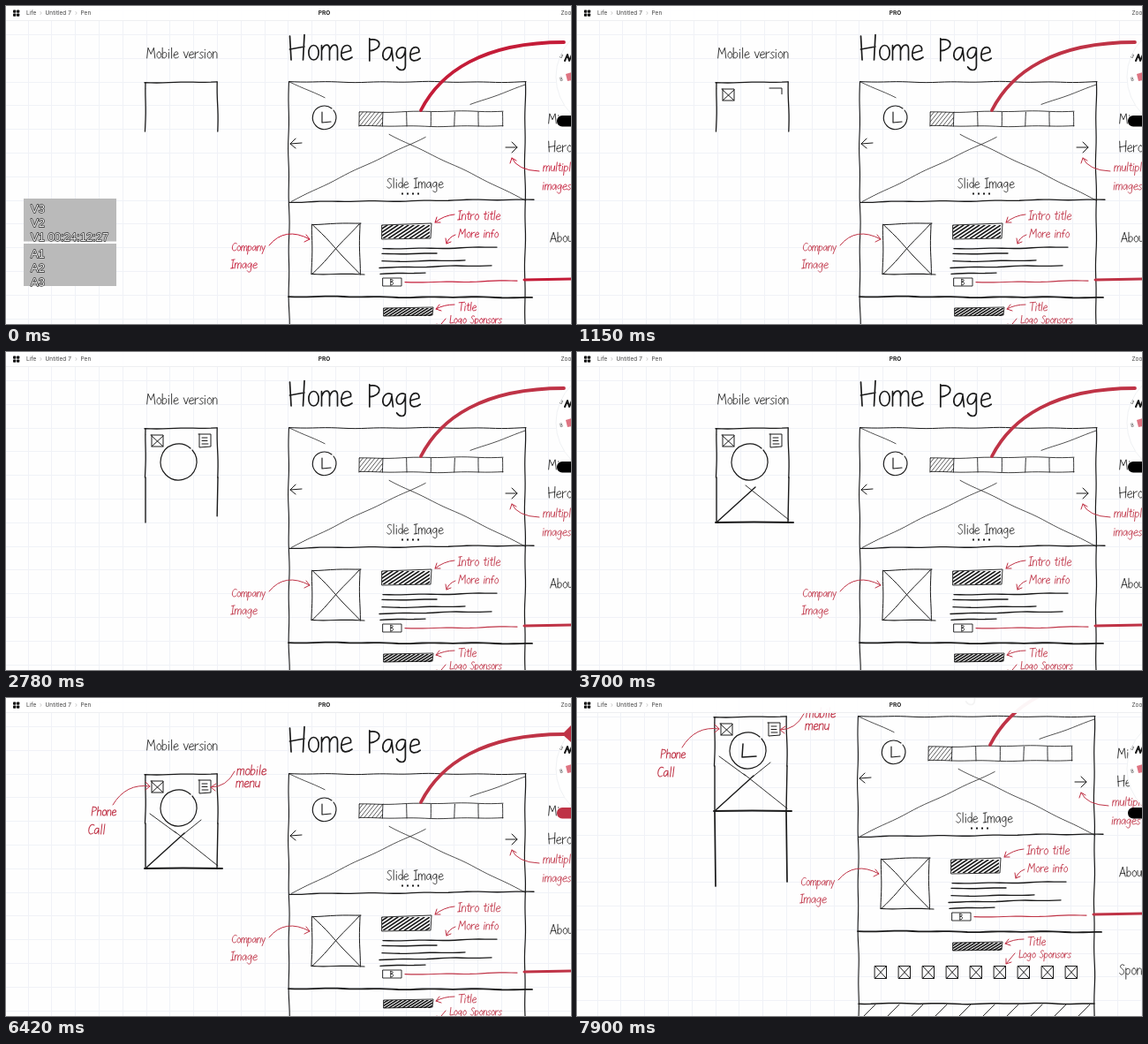
These frames come from a looping animation (640 px wide and 360 px high, 8 s). An HTML page with a canvas:

```html
<!DOCTYPE html>
<html lang="en">
<head>
<meta charset="utf-8">
<title>Wireframe sketch</title>
<style>
html, body { margin: 0; width: 100%; height: 100%; overflow: hidden; background: #fff; }
canvas { display: block; width: 640px; height: 360px; }
</style>
</head>
<body>
<canvas id="stage" width="640" height="360"></canvas>
<script>
const ctx = document.getElementById('stage').getContext('2d');
const LOOP = 8000, CELL = 26.8, INK = '#1a1a1a';
let now = 0, red = '#bf3346';

// Handwriting: advance and pen path per letter, baseline at y = 20.
const GLYPHS = {
  A: [14, 'M1 20L7 2 12 20M3 14H11'],
  B: [10, 'M2 2V20M2 3C12 2 10 10 2 10C13 10 11 20 2 20'],
  C: [12, 'M11 4C5-1 1 8 2 14S7 22 11 18'],
  H: [14, 'M1 2L2 20M12 1L11 20M1 12L12 10'],
  I: [8, 'M1 3L7 2M4 3V20M1 20L7 19'],
  L: [10, 'M2 2V20L10 19'],
  M: [17, 'M1 20L3 2 8 13 13 2 15 20'],
  P: [12, 'M2 2V20M2 3C12 1 13 11 2 12'],
  S: [11, 'M9 4C4 0 0 6 4 9S10 15 8 18 3 21 1 18'],
  T: [12, 'M0 3L12 2M6 3V20'],
  a: [11, 'M8 10C3 7 0 13 1 17S7 20 8 11L9 20'],
  b: [10, 'M1 2V20M1 13C3 8 9 9 8 15S3 21 1 18'],
  d: [10, 'M8 2V20M8 12C5 8 0 11 1 16S7 20 8 15'],
  e: [10, 'M1 15L8 13C9 8 2 7 1 14S5 21 9 18'],
  f: [8, 'M7 4Q3 1 3 8V20M0 11H6'],
  g: [11, 'M8 10C3 7 0 13 1 16S7 19 8 11V24C8 29 3 28 1 25'],
  h: [10, 'M1 2V20M1 13C3 8 8 8 8 13V20'],
  i: [5, 'M2 10V20M2 5V6'],
  l: [5, 'M2 2V20'],
  m: [15, 'M1 9V20M1 13C3 7 7 8 7 12V20M7 13C9 7 13 8 13 12V20'],
  n: [10, 'M1 9V20M1 13C3 7 8 8 8 13V20'],
  o: [10, 'M5 9C0 9 0 20 5 20S10 9 5 9'],
  p: [10, 'M1 9V28M1 12C3 8 9 9 8 15S3 21 1 18'],
  r: [8, 'M1 9V20M1 13Q3 9 7 9'],
  s: [8, 'M7 10C3 8 0 11 3 14S8 17 6 19 2 20 0 19'],
  t: [7, 'M3 4V17Q3 21 6 19M0 9L6 8'],
  u: [10, 'M1 9V16C1 21 7 20 8 15V9V20'],
  v: [9, 'M0 9L4 20 8 9'],
  y: [9, 'M0 9L4 18M8 9L3 27'],
  ' ': [8, '']
};
for (const k in GLYPHS) GLYPHS[k][1] = new Path2D(GLYPHS[k][1]);

function write(text, x, y, scale, color = INK, width = 0.85, count = text.length) {
  const slant = color === INK ? 0 : -0.12;
  ctx.save();
  ctx.translate(x, y);
  ctx.transform(scale, 0, slant * scale, scale, 0, 0);
  ctx.translate(0, -20);
  ctx.strokeStyle = color;
  ctx.lineWidth = width / scale;
  for (const ch of text.slice(0, count)) {
    ctx.stroke(GLYPHS[ch][1]);
    ctx.translate(GLYPHS[ch][0], 0);
  }
  ctx.restore();
}

function pen(path, width = 1, color = INK) {
  ctx.strokeStyle = color;
  ctx.lineWidth = width;
  ctx.stroke(new Path2D(path));
}

// Straight pen line with a slightly unsteady hand.
function wire(x1, y1, x2, y2, width = 1, color = INK) {
  const length = Math.hypot(x2 - x1, y2 - y1), steps = Math.ceil(length / 7);
  const nx = (y1 - y2) / length, ny = (x2 - x1) / length;
  ctx.beginPath();
  for (let i = 0; i <= steps; i++) {
    const p = i / steps, s = p * length;
    const off = 0.35 * Math.sin(s / 9 + x1) + 0.3 * Math.sin(s / 23 + y1);
    ctx.lineTo(x1 + (x2 - x1) * p + nx * off, y1 + (y2 - y1) * p + ny * off);
  }
  ctx.strokeStyle = color;
  ctx.lineWidth = width;
  ctx.stroke();
}

// Pen stroke growing between two times, appearing with a given share drawn.
function grow(path, length, from, to, width = 1.2, color = INK, share = 0.1) {
  if (now < from) return;
  const p = to > from ? Math.min(1, share + (1 - share) * (now - from) / (to - from)) : 1;
  if (p < 1) ctx.setLineDash([length * p, 999]);
  pen(path, width, color);
  ctx.setLineDash([]);
}

function hatch(x, y, w, h, gap, width, lean) {
  ctx.save();
  ctx.beginPath();
  ctx.rect(x, y, w, h);
  ctx.clip();
  for (let i = x - h * lean; i < x + w; i += gap) pen(`M${i} ${y + h}L${i + h * lean} ${y}`, width);
  ctx.restore();
}

const crossBox = (x, y, w, h, width) =>
  pen(`M${x} ${y}h${w}v${h}h${-w}zl${w} ${h}m0 ${-h}l${-w} ${h}`, width);

function grid(dx, dy) {
  ctx.fillStyle = '#f0f2f7';
  for (let x = (24.6 + dx) % CELL; x < 640; x += CELL) ctx.fillRect(Math.round(x), 0, 1, 360);
  for (let y = (5.1 + 3 * CELL + dy) % CELL; y < 360; y += CELL) ctx.fillRect(0, Math.round(y), 640, 1);
}

function homePage() {
  write('Home', 320, 61, 1.5, INK, 1.7);
  write('Page', 409, 62, 1.4, INK, 1.7);
  wire(320, 86, 589, 86, 1);
  wire(588, 86, 588, 430, 1.2);
  wire(320, 86, 321, 430, 1.1);
  wire(321, 222, 598, 219, 1.3);
  wire(320, 329, 596, 330, 1.8);
  wire(321, 411, 588, 411, 1.5);
  wire(321, 86, 361, 104, 0.75);
  wire(526, 112, 588, 89, 0.75);
  wire(323, 221, 475, 148, 0.75);
  wire(434, 145, 589, 220, 0.75);
  pen('M369 116A13.3 13.3 0 1 0 371 118M358 120V132L368 131', 1.15);
  wire(400, 120, 563, 119, 0.85);
  wire(400, 136, 563, 136, 0.85);
  for (let x = 400; x < 570; x += 27.1) wire(x, 120, x, 136, 0.85);
  hatch(400, 120, 27, 16, 4.5, 0.7, 0.8);
  pen('M335 155L322 156M328 150L322 156 328 161M566 160H579M573 154L579 160 573 166', 1);
  write('Slide Image', 431, 206, 0.625);
  ctx.fillStyle = INK;
  for (let x = 449; x < 470; x += 6) ctx.fillRect(x - 1, 211.5, 2, 2);

  wire(347, 247, 402, 246);
  wire(401, 246, 401, 304);
  wire(347, 247, 346, 303);
  wire(346, 303, 406, 304, 1.2);
  wire(348, 248, 400, 303);
  wire(400, 247, 347, 303);
  pen('M426 248L482 246 481 263 426 264Z', 0.9);
  hatch(426, 248, 54, 15, 6, 1.6, 1.5);
  wire(427, 275, 556, 273, 1.4);
  wire(426, 281, 488, 280, 1.4);
  wire(426, 289, 520, 288, 1.4);
  wire(423, 296, 550, 294, 1.4);
  wire(424, 303, 475, 302, 1.4);
  pen('M427 308H448V317H427Z', 0.9);
  write('B', 435, 316, 0.38);
  pen('M428 342L484 341 483 350 428 351Z', 0.9);
  hatch(428, 342, 55, 9, 5, 1.6, 1.6);
  for (let i = 0; i < 9; i++) crossBox(339.5 + i * 27, 368.5, 13, 14, 1);
  for (let x = 327; x < 585; x += 27) pen(`M${x} 425L${x + 13} 412`, 0.9);

  write('Mi', 614, 133, 0.62);
  write('Hero', 614, 165, 0.66);
  write('About', 616, 267, 0.6);
  write('Sponsors', 616, 378, 0.65);
}

function notes() {
  write('Intro title', 511, 242, 0.58, red);
  write('More info', 512, 262, 0.535, red);
  write('Company', 255, 277, 0.5, red);
  write('Image', 254, 297, 0.56, red);
  write('Title', 512, 345, 0.54, red);
  write('Logo Sponsors', 502, 359, 0.48, red);
  write('multiple', 608, 187, 0.56, red);
  write('images', 607, 208, 0.55, red);
  pen('M508 236Q496 237 486 245M488 239L486 245 492 245', 1, red);
  pen('M509 259Q501 262 499 269M498 263L499 269 504 267', 1, red);
  pen('M298 271Q316 249 344 264M340 259L344 264 338 267', 1, red);
  pen('M604 187Q579 186 573 172M571 178L573 172 578 175', 1, red);
  pen('M508 338Q496 338 487 343M491 338L487 343 493 345', 1, red);
  pen('M498 354L488 366M488 360L488 366 494 364', 1, red);
  wire(452, 313, 579, 311, 1.2, red);
  pen('M587 310L642 309', 3, red);
  pen('M470 118C492 75 540 41 632 41', 3.8, red);
}

function mobilePage() {
  write('Mobile version', 159, 59, 0.65);
  wire(157, 87, 239, 85.5, 1.3);
  wire(158, 87, 158, 142, 1.3);
  wire(239, 86, 240, 142, 1.3);
  grow('M164 94H178V107H165V94', 54, 310, 560, 1);
  grow('M165 95L178 107', 18, 600, 720, 1);
  grow('M178 95L165 107', 18, 740, 860, 1);
  grow('M218 93L232 93V107L219 108V93', 57, 1040, 1420, 1);
  grow('M222 97H228M222 100.5H228M222 104H229', 7, 1630, 1870, 1);
  grow('M209 109A20.5 20.5 0 1 0 211 111', 127, 2130, 2300, 1.2, INK, 0.55);
  grow('M158 142V193', 51, 2540, 2660, 1.4);
  grow('M240 142L239 193', 51, 2680, 2800, 1.4);
  grow('M157 193Q200 192 245 193', 88, 2820, 2960, 1.9);
  grow('M159 192L202 153', 59, 3180, 3300, 1.4, INK, 0.5);
  grow('M191 151L240 190', 0, 3700, 3700, 0.9);
  grow('M163 131L193 153M200 155L221 138', 0, 4260, 4260, 0.9);

  grow('M259 83Q250 101 232 101M238 97L232 101 237 105', 0, 4630, 4630, 1, red);
  if (now >= 4940) write('mobile', 261, 87, 0.62, red, 1);
  if (now >= 5280) write('menu', 260, 101, 0.62, red, 1);
  grow('M121 121Q136 96 163 100M158 95L163 100 158 104', 0, 5650, 5650, 1, red);
  if (now >= 5650) write('Phone', 96, 133, 0.56, red, 1);
  if (now >= 6020) write('Call', 92, 154, 0.62, red, 1, now < 6420 ? 1 : 4);
  grow('M190 117L189 132 205 131', 0, 6890, 6890, 1.5);
  grow('M298 56Q278 54 258 57M265 51L258 57 266 61', 0, 7320, 7320, 1.5);
  grow('M158 194L159 278', 0, 7780, 7780, 1.7);
  grow('M239 194L240 273', 0, 7900, 7900, 1.7);
}

function palette() {
  const redPen = now >= 4630 && now < 6890;
  ctx.fillStyle = '#fff';
  ctx.strokeStyle = '#f0f2f4';
  ctx.lineWidth = 1;
  ctx.beginPath();
  ctx.arc(683, 80, 60, 0, 7);
  ctx.fill();
  ctx.stroke();
  if (redPen) {
    ctx.fillStyle = red;
    ctx.fill(new Path2D('M630 41L640 31V50Z'));
  }
  pen('M633 62L636 55 638 62 642 53', 2);
  ctx.fillStyle = '#df7482';
  ctx.fill(new Path2D('M634 77L641 75V84L636 85Z'));
  ctx.fillStyle = '#444';
  ctx.font = '6px Inter, sans-serif';
  ctx.textAlign = 'center';
  for (const [label, y, turn] of [['3', 57, 0.5], ['8', 83, -0.2]]) {
    ctx.save();
    ctx.translate(629, y);
    ctx.rotate(turn);
    ctx.fillText(label, 0, 2);
    ctx.restore();
  }
  ctx.fillStyle = redPen ? red : '#000';
  ctx.beginPath();
  ctx.roundRect(624, 124, 30, 12.5, 6);
  ctx.fill();
}

function topBar() {
  ctx.fillStyle = 'rgba(255,255,255,.95)';
  ctx.fillRect(0, 0, 640, 16);
  ctx.fillStyle = '#eeeff1';
  ctx.fillRect(0, 16, 640, 1);
  ctx.fillStyle = '#111';
  for (const x of [8, 12]) for (const y of [4.5, 8.5]) {
    ctx.beginPath();
    ctx.roundRect(x, y, 3.3, 3.3, 0.8);
    ctx.fill();
  }
  ctx.textAlign = 'left';
  ctx.font = '6.5px Inter, sans-serif';
  ctx.fillStyle = '#444';
  ctx.fillText('Life', 23, 10.3);
  ctx.fillText('Untitled 7', 44.5, 10.3);
  ctx.fillText('Pen', 84.5, 10.3);
  ctx.fillText('Zoom', 628.5, 10.3);
  pen('M39 6.5L40.2 8 39 9.5M79 6.5L80.2 8 79 9.5', 0.6, '#aaa');
  ctx.textAlign = 'center';
  if (now >= 7320 && now < 7780) {
    ctx.fillStyle = '#b4b4b4';
    ctx.fillText('Saved', 360.5, 10.3);
  }
  ctx.fillStyle = '#222';
  ctx.font = 'bold 6.5px Inter, sans-serif';
  ctx.fillText('PRO', 360.5, 10.3);
}

function timecode() {
  ctx.fillStyle = '#bababa';
  ctx.fillRect(20, 218, 105, 48.5);
  ctx.fillRect(20, 269, 105, 48);
  ctx.font = '13px "Liberation Sans", Arial, sans-serif';
  ctx.textAlign = 'left';
  ctx.lineWidth = 1.3;
  const rows = ['V3', 'V2', 'V1 00:24:12:27', 'A1', 'A2', 'A3'];
  rows.forEach((row, i) => {
    const y = 234 + i * 16 + (i > 2 ? 3 : 0);
    ctx.strokeStyle = '#2a2a2a';
    ctx.strokeText(row, 28, y);
    ctx.fillStyle = '#f2f2f2';
    ctx.fillText(row, 28, y);
  });
}

function draw(t) {
  now = t;
  red = t < 250 ? '#c41c38' : '#bf3346';
  const [dx, dy] = t < 7780 ? [0, 0] : [-2, -65];
  ctx.fillStyle = '#fefefe';
  ctx.fillRect(0, 0, 640, 360);
  ctx.lineCap = ctx.lineJoin = 'round';
  grid(dx, dy);
  ctx.save();
  ctx.translate(dx, dy);
  homePage();
  notes();
  mobilePage();
  ctx.restore();
  palette();
  topBar();
  if (t < 250) timecode();
}

const start = performance.now();
function frame() {
  draw((performance.now() - start) % LOOP);
  requestAnimationFrame(frame);
}
frame();
</script>
</body>
</html>
```
